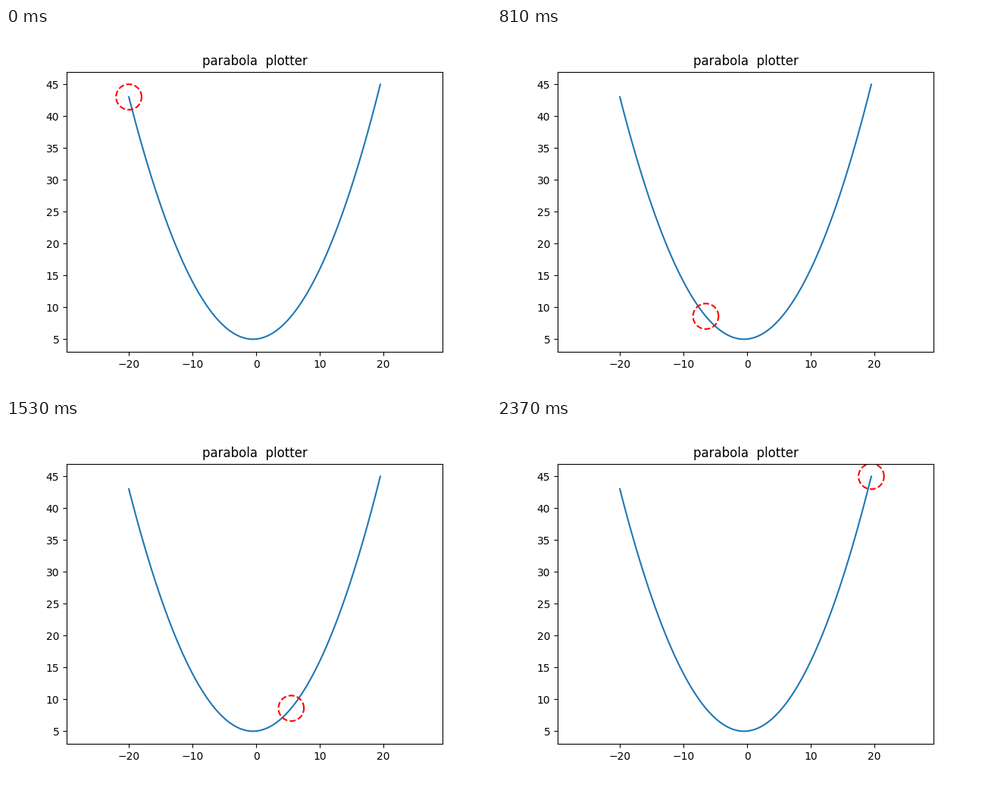
A matplotlib script that plays this animation: 640 by 480 pixels, repeating every 2.4 s.

```python
import numpy as np
import matplotlib.pyplot as plt
from matplotlib.animation import FuncAnimation

RADIUS = 2
MARGIN = 2
UNIT_PX = 8.4  # pixels per data unit on both axes


def parabola(x):
    return 0.1 * x**2 + 0.1 * x + 5


xs = np.arange(-20, 20, 0.5)
ys = parabola(xs)
theta = np.linspace(0, 2 * np.pi, 100)

fig, ax = plt.subplots(figsize=(6.4, 4.8), dpi=100)
ax.set_title("parabola  plotter")
ax.plot(xs, ys)
ring, = ax.plot([], [], "r--")

# Equal scaling: the width of the axes is 496 px, centred on the data.
center = (xs[0] + xs[-1]) / 2
half_width = 496 / UNIT_PX / 2
ax.set_xlim(center - half_width, center + half_width)
ax.set_ylim(ys.min() - MARGIN, ys.max() + MARGIN)


def update(i):
    ring.set_data(xs[i] + RADIUS * np.cos(theta),
                  ys[i] + RADIUS * np.sin(theta))
    return ring,


anim = FuncAnimation(fig, update, frames=len(xs), interval=30,
                     repeat=True, repeat_delay=0, blit=False)
plt.show()
```
